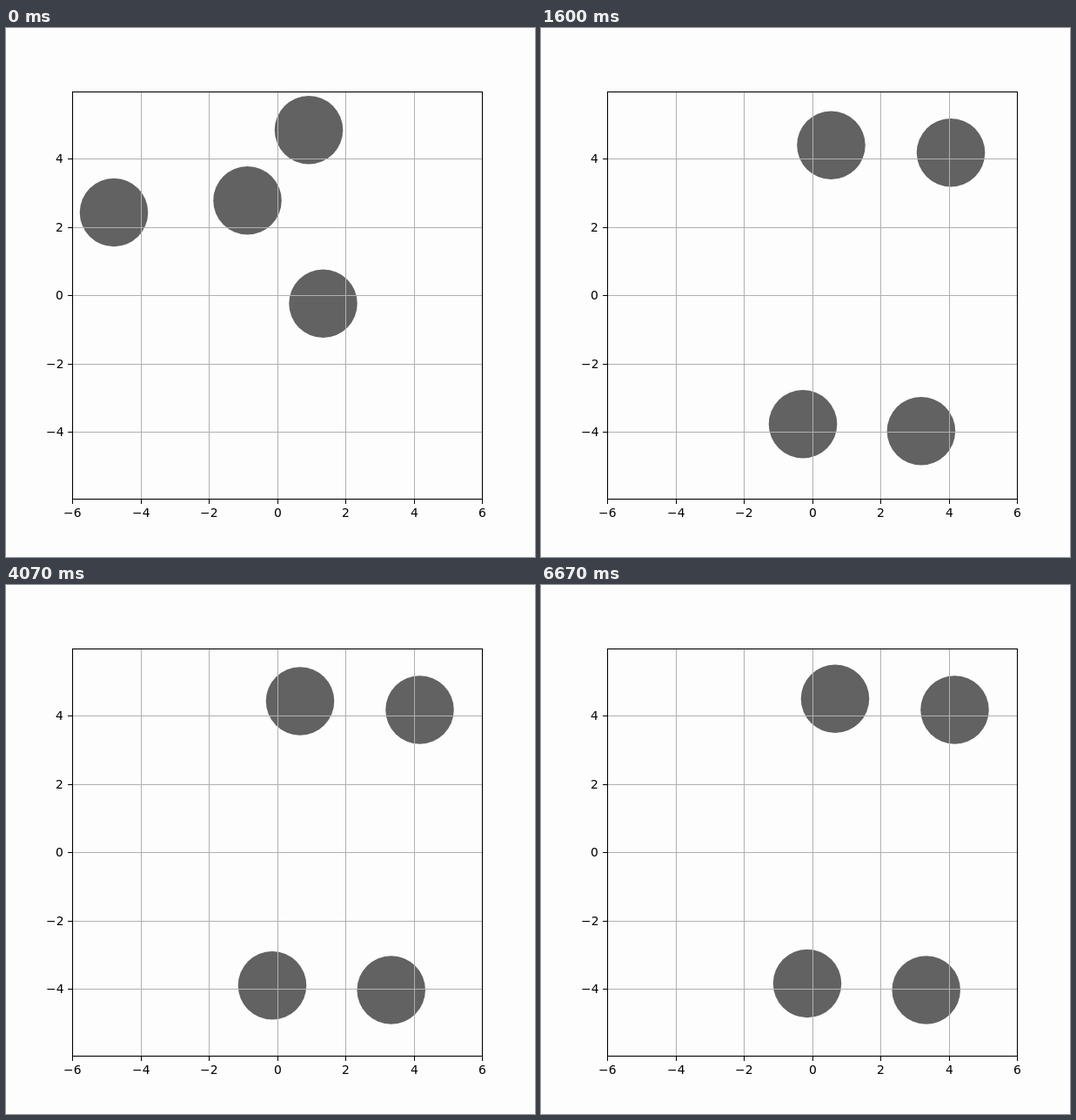
Write an HTML page with a canvas that moves like this. It is 608 px wide and 608 px high and loops after 6740 ms.

```html
<!DOCTYPE html>
<html lang="en">
<head>
<meta charset="utf-8">
<title>Four moving discs</title>
<style>
  html, body { margin: 0; width: 100%; height: 100%; overflow: hidden; background: #fdfdfd; }
  canvas { display: block; width: 608px; height: 608px; }
</style>
</head>
<body>
<canvas id="stage" width="608" height="608"></canvas>
<script>
const ctx = document.getElementById('stage').getContext('2d');
const LOOP = 6740, FPS = 15;
const UNIT = 39.27;                       // pixels per axis unit, also the disc radius
const LEFT = 76, RIGHT = 547, TOP = 73, BOTTOM = 541;
const toX = n => Math.round(311.6 + n * UNIT);
const toY = n => Math.round(307.2 - n * UNIT);

// Each disc springs from start through via (at VIA_TIME) to rest; rise is a slow upward drift in px/s.
const PULL = 3.4, VIA_TIME = 8 / FPS;
const discs = [
  { start: [124, 212], via: [224, 345.7], rest: [306, 464], rise: 0.9 },
  { start: [277.5, 198.3], via: [274.7, 129], rest: [338, 137.5], rise: 1 },
  { start: [348, 117.2], via: [405.8, 138], rest: [475.5, 143.5], rise: 0 },
  { start: [364.5, 316.7], via: [361.7, 421], rest: [442.7, 465.5], rise: 0 }
];

// Critically damped spring: (a + b t) e^(-PULL t) around the resting place.
function spring(start, via, rest, t) {
  const a = start - rest;
  const b = ((via - rest) * Math.exp(PULL * VIA_TIME) - a) / VIA_TIME;
  return rest + (a + b * t) * Math.exp(-PULL * t);
}

function rect(color, x, y, w, h) {
  ctx.fillStyle = color;
  ctx.fillRect(x, y, w, h);
}

function drawDiscs(t) {
  ctx.fillStyle = '#626262';
  for (const { start, via, rest, rise } of discs) {
    const [x, y] = [0, 1].map(i => spring(start[i], via[i], rest[i], t));
    ctx.beginPath();
    ctx.arc(x, y - rise * t, UNIT, 0, Math.PI * 2);
    ctx.fill();
  }
}

function drawGrid() {
  for (let n = -4; n <= 4; n += 2) {
    rect('#b0b0b0', toX(n), TOP, 1, BOTTOM - TOP);
    rect('#b0b0b0', LEFT, toY(n), RIGHT - LEFT, 1);
  }
}

function drawAxes() {
  ctx.strokeStyle = '#000';
  ctx.lineWidth = 1.1;
  ctx.strokeRect(LEFT + 0.5, TOP + 0.5, RIGHT - LEFT, BOTTOM - TOP);
  ctx.font = '13.89px "DejaVu Sans", sans-serif';
  for (let n = -6; n <= 6; n += 2) {
    const label = String(n).replace('-', '\u2212');
    const width = ctx.measureText(label).width;
    rect('#000', toX(n), BOTTOM + 1, 1, 5);
    ctx.fillText(label, Math.round(toX(n) - width / 2), 562);
    if (Math.abs(n) < 6) {
      rect('#000', LEFT - 5, toY(n), 5, 1);
      ctx.fillText(label, Math.round(66 - width), toY(n) + 5);
    }
  }
}

function draw(time) {
  // Poses change 15 times a second, on whole hundredths of a second.
  const hundredths = Math.floor(time % LOOP / 10);
  const step = Math.floor((hundredths + 0.5) * FPS / 100);
  rect('#fdfdfd', 0, 0, 608, 608);
  drawDiscs(step / FPS);
  drawGrid();
  drawAxes();
}

const begin = performance.now();
function tick() {
  draw(performance.now() - begin);
  requestAnimationFrame(tick);
}
tick();
</script>
</body>
</html>
```
